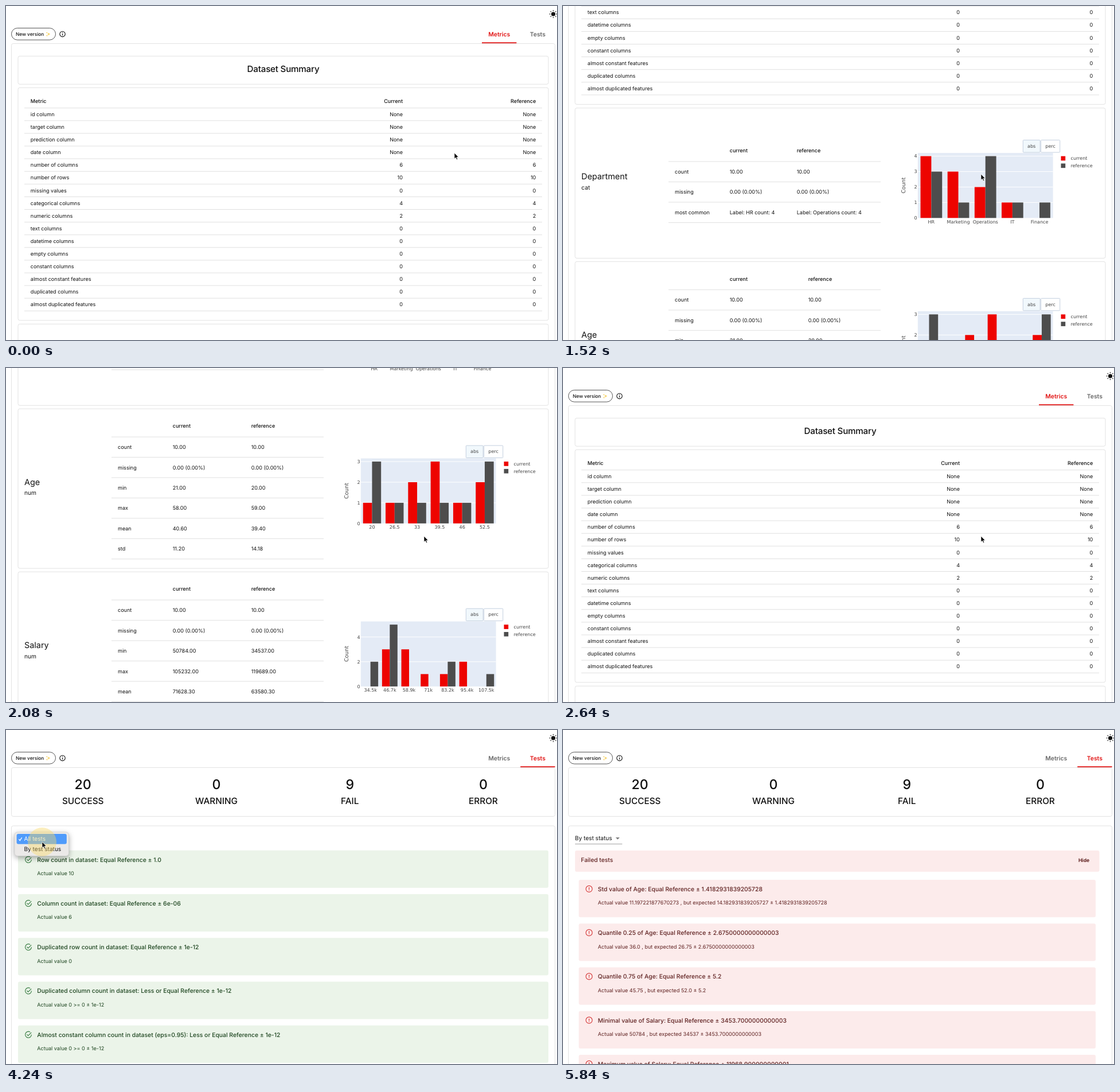
An HTML page that plays this animation: 961x582 px, repeating every 6160 ms.

```html
<!DOCTYPE html>
<html lang="en">
<head>
<meta charset="utf-8">
<title>Data report</title>
<style>
html, body { margin: 0; width: 100%; height: 100%; overflow: hidden; background: #fff; }
svg { display: block; width: 961px; height: 582px; }
text { font-family: Inter, "Liberation Sans", sans-serif; text-rendering: geometricPrecision; }
.chart text { font-family: "DejaVu Sans", sans-serif; fill: #444; }
.good text { fill: #1e4620; }
.bad text { fill: #5f2120; }
</style>
</head>
<body>
<svg id="stage" viewBox="0 0 961 582" fill="#111"></svg>
<script>
const LOOP = 6160, STEP = 80, BODY = 9.05, BOTTOM = 750.7, LIST = 700;
const RED = '#ed0400', GREY = '#4d4d4d', TAB = '#e11212';
const END = 'text-anchor="end"', MID = 'text-anchor="middle"', MEDIUM = 'font-weight="500"', BOLD = 'font-weight="700"';

const text = (x, y, s, size = BODY, more = '') => `<text x="${x}" y="${y}" font-size="${size}" ${more}>${s}</text>`;
const rect = (x, y, w, h, fill, more = '') => `<rect x="${x}" y="${y}" width="${w}" height="${h}" fill="${fill}" ${more}/>`;
const box = (x, y, w, h, more = '') => rect(x, y, w, h, '#fff', `rx="3" stroke="#e3e3e3" ${more}`);
const rule = (x1, x2, y, color = '#e0e0e0') => `<path d="M${x1} ${y}H${x2}" stroke="${color}"/>`;
const star = (x, y, r) => `<path d="M${x} ${y - r}Q${x} ${y} ${x + r} ${y}Q${x} ${y} ${x} ${y + r}Q${x} ${y} ${x - r} ${y}Q${x} ${y} ${x} ${y - r}" fill="#f5d05c"/>`;

function header() {
  let rays = '';
  for (let a = 0; a < 360; a += 45) rays += `<path d="M954.5 7.2v1.6" stroke="#111" stroke-width="1.3" transform="rotate(${a} 954.5 14)"/>`;
  return `<circle cx="954.5" cy="14" r="3.6"/>${rays}` +
    rect(9.5, 38.5, 77, 20.6, '#fff', 'rx="10.3" stroke="#555"') +
    text(17, 52.1, 'New version', 8.3, MEDIUM) + star(74.5, 49, 3.4) + star(71.3, 46.4, 1.6) + star(71.5, 51.6, 1.8) +
    '<circle cx="98.5" cy="48.9" r="4.7" fill="none" stroke="#111" stroke-width="1.1"/><path d="M98.5 48.2v3.4M98.5 46v1.1" stroke="#111" stroke-width="1.1"/>' +
    text(860.2, 52.8, 'Metrics', 10.4, MID + ' font-weight="600" id="tabMetrics"') +
    text(927.3, 52.8, 'Tests', 10.4, MID + ' font-weight="600" id="tabTests"');
}

function summary() {
  const rows = [['id column', 'None'], ['target column', 'None'], ['prediction column', 'None'], ['date column', 'None'],
    ['number of columns', 6], ['number of rows', 10], ['missing values', 0], ['categorical columns', 4], ['numeric columns', 2],
    ...['text columns', 'datetime columns', 'empty columns', 'constant columns', 'almost constant features',
      'duplicated columns', 'almost duplicated features'].map(s => [s, 0])];
  const cells = (y, a, b, c, more = '') => text(42.8, y, a, BODY, more) + text(692, y, b, BODY, END + ' ' + more) + text(924.3, y, c, BODY, END + ' ' + more);
  return box(21, 87.3, 925, 49) + text(483.5, 115.2, 'Dataset Summary', 15.2, `${MID} ${MEDIUM} letter-spacing="-.22"`) +
    box(21, 142.3, 925, 405.5) + cells(168.6, 'Metric', 'Current', 'Reference', MEDIUM) + rule(32, 935, 177.7) +
    rows.map(([name, v], i) => cells(191.9 + 22.1 * i, name, v, v) + rule(32, 935, 199.8 + 22.1 * i)).join('');
}

function chart(top, labels, cur, ref, step) {
  const left = 618.8, width = 235.8, height = 113.3, base = top + height;
  const unit = height * .951 / Math.max(...cur, ...ref), pitch = width / labels.length, w = pitch * .4;
  let s = rect(left, top, width, height, '#e4ebf6');
  for (let v = 0; v * unit < height; v += step) {
    if (v) s += rule(left, left + width, base - v * unit, '#fff');
    s += text(617.5, base - v * unit + 2.9, v, 8, END);
  }
  labels.forEach((label, i) => {
    const mid = left + pitch * (i + .5);
    s += rect(mid - w, base - cur[i] * unit, w, cur[i] * unit, RED) + rect(mid, base - ref[i] * unit, w, ref[i] * unit, GREY) +
      text(mid, base + 9.2, label, 8, MID);
  });
  s += text(0, 0, 'Count', 9.4, `${MID} transform="translate(597 ${top + 56.5}) rotate(-90)"`);
  [['current', RED], ['reference', GREY]].forEach(([name, color], i) => {
    s += rect(868.5, top + 5.6 + 12.8 * i, 7.7, 7.7, color) + text(885.5, top + 12.4 + 12.8 * i, name, 8);
  });
  [['abs', 802.3, 29.7, '#f1f8fc'], ['perc', 833.5, 33.2, '#fff']].forEach(([name, x, w, fill]) => {
    s += rect(x, top - 22.4, w, 21.4, fill, 'rx="1" stroke="#c3cfdf"') + text(x + w / 2, top - 9.2, name, 8, MID);
  });
  return `<g class="chart">${s}</g>`;
}

function column(top, h, name, kind, col2, line, rows, ...bars) {
  const mid = top + h / 2, y0 = top + line;
  return box(21, top, 925, h) + text(32, mid - 6.3, name, 14.4) + text(32, mid + 11.4, kind, 10.2) +
    text(290.7, y0 - 15.8, 'current', 9, MEDIUM) + text(col2, y0 - 15.8, 'reference', 9, MEDIUM) + rule(184, 554, y0) +
    rows.map(([label, a, b], i) => {
      const y = y0 + 35.45 * i;
      return text(195, y + 21, label) + text(290.7, y + 21, a) + text(col2, y + 21, b) + rule(184, 554, y + 35.45);
    }).join('') + chart(mid - 52.6, ...bars);
}

const common = [['count', '10.00', '10.00'], ['missing', '0.00 (0.00%)', '0.00 (0.00%)']];
const metrics = () => box(9.5, 65.5, 948, 1500) + summary() +
  column(554.2, 261.7, 'Department', 'cat', 407.7, 93.2, [...common, ['most common', 'Label: HR count: 4', 'Label: Operations count: 4']],
    ['HR', 'Marketing', 'Operations', 'IT', 'Finance'], [4, 3, 2, 1, 0], [3, 1, 4, 1, 1], 1) +
  column(821.8, 278, 'Age', 'num', 427.7, 49, [...common, ['min', '21.00', '20.00'], ['max', '58.00', '59.00'], ['mean', '40.60', '39.40'], ['std', '11.20', '14.18']],
    [20, 26.5, 33, 39.5, 46, 52.5], [1, 1, 2, 3, 1, 2], [3, 1, 1, 1, 1, 3], 1) +
  column(1105.9, 278, 'Salary', 'num', 427.7, 49, [...common, ['min', '50784.00', '34537.00'], ['max', '105232.00', '119689.00'], ['mean', '71628.30', '63580.30']],
    ['34.5k', '46.7k', '58.9k', '71k', '83.2k', '95.4k', '107.5k'], [0, 3, 3, 1, 1, 2, 0], [2, 5, 0, 0, 2, 0, 1], 2);

const tick = '<path d="M3.1 -4.4A5.4 5.4 0 1 0 5.4 0M-2.6 -.4L-.4 1.9 5.2 -3.7" fill="none" stroke="#3a7d44" stroke-width="1.15"/>';
const alarm = '<circle r="5.5" fill="none" stroke="#d63a3a" stroke-width="1.15"/><path d="M0 -2.9V.8M0 1.7V2.9" stroke="#d63a3a" stroke-width="1.15"/>';
const GOOD = '#ebf4e9', BAD = '#fcebeb';

const cards = (x, y, w, good, list) => `<g class="${good ? 'good' : 'bad'}">` + list.map(([title, detail], i) => {
  const top = y + 76.25 * i;
  return rect(x, top, w, 65.3, good ? GOOD : BAD, 'rx="3"') +
    `<g transform="translate(${x + 18} ${top + 16})">${good ? tick : alarm}</g>` +
    text(x + 33.3, top + 19.9, title, 10.38, MEDIUM) + text(x + 33.3, top + 43.4, 'Actual value ' + detail);
}).join('') + '</g>';

const bar = (y, kind, fill, title, id) => `<g class="${kind}">` + rect(21, y, 914.5, 37, fill, 'rx="3"') +
  text(31.3, y + 20.1, title, 10.3, MEDIUM) + text(908.6, y + 20.2, 'Show', 8.6, `${MID} ${BOLD} id="${id}"`) + '</g>';

const select = (label, right) => text(20.8, 192.3, label, 10.15) + `<path d="M${right - 11.5} 187.3h7l-3.5 3.5z" fill="#777"/>` +
  `<path class="under" d="M21 198.7H${right}"/>`;

function tests() {
  const zero = '0 &gt;= 0 ± 1e-12';
  return box(9.5, 65.5, 948, 85) +
    [[20, 'SUCCESS'], [0, 'WARNING'], [9, 'FAIL'], [0, 'ERROR']].map(([n, name], i) =>
      text(134.2 + 232.75 * i, 102.8, n, 23.2, `${MID} ${MEDIUM}`) + text(134.2 + 232.75 * i, 128.9, name, 15.3, `${MID} ${MEDIUM}`)).join('') +
    box(9.5, 167, 948, 155, 'id="frame"') +
    '<g id="all">' + select('All tests', 76) + cards(21, 209.8, 925, true, [
      ['Row count in dataset: Equal Reference ± 1.0', '10'],
      ['Column count in dataset: Equal Reference ± 6e-06', '6'],
      ['Duplicated row count in dataset: Equal Reference ± 1e-12', '0'],
      ['Duplicated column count in dataset: Less or Equal Reference ± 1e-12', zero],
      ['Almost constant column count in dataset (eps=0.95): Less or Equal Reference ± 1e-12', zero]]) + '</g>' +
    '<g id="status">' + select('By test status', 103.3) + bar(210, 'bad', BAD, 'Failed tests', 'toggle') +
    '<clipPath id="fold"><rect id="foldBox" y="247" width="961" height="0"/></clipPath><g clip-path="url(#fold)">' +
    cards(27.5, 260.9, 901.5, false, [
      ['Std value of Age: Equal Reference ± 1.4182931839205728', '11.197221877670273 , but expected 14.182931839205727 ± 1.4182931839205728'],
      ['Quantile 0.25 of Age: Equal Reference ± 2.6750000000000003', '36.0 , but expected 26.75 ± 2.6750000000000003'],
      ['Quantile 0.75 of Age: Equal Reference ± 5.2', '45.75 , but expected 52.0 ± 5.2'],
      ['Minimal value of Salary: Equal Reference ± 3453.7000000000003', '50784 , but expected 34537 ± 3453.7000000000003'],
      ['Maximum value of Salary: Equal Reference ± 11968.900000000001', '105232 , but expected 119689 ± 11968.900000000001']]) +
    '</g><g id="passed">' + bar(268.5, 'good', GOOD, 'Passed tests', 'show') + '</g></g>' +
    '<g id="menu">' + rect(15, 178, 94.5, 41.5, '#ebe9e8', 'rx="5" stroke="#c9c9c9" stroke-width=".6" style="filter:drop-shadow(0 3px 5px #0005)"') +
    rect(18.5, 181, 87.3, 17.7, '#4f9bfb', 'rx="3"') + '<path d="M22.4 190.2l1.9 2.4 3.4-5.2" fill="none" stroke="#fff" stroke-width="1.2"/>' +
    text(31.4, 193.1, 'All tests', 10.15, 'fill="#fff"') + text(31.4, 210.7, 'By test status', 10.15) + '</g>';
}

const $ = id => document.getElementById(id);
const set = (id, attrs) => { for (const k in attrs) $(id).setAttribute(k, attrs[k]); };
const show = (id, on) => set(id, { display: on ? 'inline' : 'none' });

$('stage').innerHTML = `<g id="page"><g id="metrics">${metrics()}</g><g id="tests">${tests()}</g>${header()}` +
  rect(830, 63.3, 60.4, 1.7, TAB, 'id="marker"') + '</g>' +
  '<g id="mouse"><circle id="halo" r="25" fill="#f8da66"/>' +
  '<path d="M0 0V10.2L2.4 8 4 11.8 5.7 11.1 4.1 7.4H7.3Z" fill="#000" stroke="#fff" stroke-width=".7"/></g>';

const ease = p => (1 - Math.cos(Math.PI * Math.min(1, Math.max(0, p)))) / 2;
const CLICKS = [3040, 4160, 4400, 5280];
const PATH = [[0, 782, 256], [80, 782, 256], [240, 782, 277], [720, 782, 277], [880, 729, 293], [2720, 729, 293],
  [2880, 914, 47], [3600, 914, 47], [4080, 63, 195], [4320, 63, 195], [4400, 64, 205], [4560, 64, 205],
  [4800, 162, 321], [5200, 906, 223], [5520, 906, 223], [5840, 860, -30], [LOOP, 860, -30]];

function pointer(t) {
  const i = PATH.findIndex(k => k[0] > t), [t0, x0, y0] = PATH[i - 1], [t1, x1, y1] = PATH[i];
  const p = (t - t0) / (t1 - t0);
  return [x0 + (x1 - x0) * p, y0 + (y1 - y0) * p];
}

function draw(now) {
  const t = Math.floor(now % LOOP / STEP) * STEP;
  const scroll = BOTTOM * (t < 2400 ? ease((t - 959) / 1120) : 1 - ease((t - 2320) / 320));
  const onTests = t >= 3120, byStatus = t >= 4480, open = LIST * ease((t - 5280) / 240);
  const focused = t >= 4160 && t < 5280;

  set('page', { transform: `translate(0 ${-scroll})` });
  show('metrics', !onTests);
  show('tests', onTests);
  set('tabMetrics', { fill: onTests ? '#666' : TAB });
  set('tabTests', { fill: onTests ? TAB : '#666' });
  set('marker', { x: 830 + 67.2 * ease((t - 3040) / 320) });

  show('all', !byStatus);
  show('status', byStatus);
  show('menu', t >= 4160 && !byStatus);
  set('frame', { height: byStatus ? 155 + open : 800 });
  set('foldBox', { height: open });
  set('passed', { transform: `translate(0 ${open})` });
  $('toggle').textContent = t >= 5280 ? 'Hide' : 'Show';
  for (const u of document.querySelectorAll('.under')) {
    u.setAttribute('stroke', focused ? '#111' : '#888');
    u.setAttribute('stroke-width', focused ? 1.4 : .8);
  }

  const since = Math.min(...CLICKS.filter(c => c <= t).map(c => t - c), 400);
  set('halo', { opacity: .42 * Math.min(1, (400 - since) / 240) });
  set('mouse', { transform: `translate(${pointer(t)})` });
}

function tickFrame() {
  draw(performance.now());
  requestAnimationFrame(tickFrame);
}
tickFrame();
</script>
</body>
</html>
```
